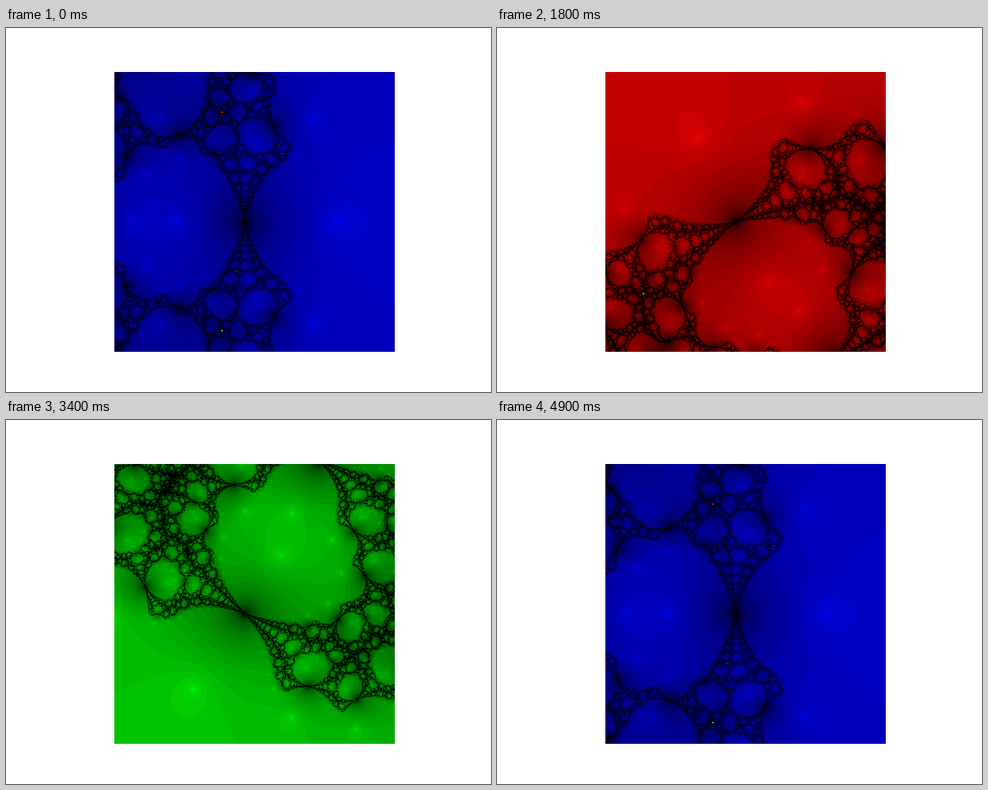
An HTML page with a canvas for the animation above (5000 ms loop, 640x480 px).

```html
<!DOCTYPE html>
<html lang="en">
<head>
<meta charset="utf-8">
<title>Nova fractal</title>
<style>
html, body { margin: 0; width: 100%; height: 100%; overflow: hidden; background: #fff; }
canvas { position: absolute; left: 143px; top: 58px; }
</style>
</head>
<body>
<canvas id="view" width="370" height="369"></canvas>
<script>
const W = 370, H = 369, STEPS = 50, STEP_MS = 100;
const SCALE = 369.6 / 1.87;          // pixels per unit
const X0 = 172.15, Y0 = 197.25;      // origin inside the canvas
const MAX = 30, TOL2 = 0.01 ** 2;
const RED = 0, GREEN = 1, BLUE = 2;
const ctx = document.getElementById('view').getContext('2d');
const cache = [];

// Channel of the cube root of unity closest in direction
function rootChannel(x, y) {
  if (x > -Math.abs(y) / Math.sqrt(3) && Math.abs(y) < Math.sqrt(3) * x) return BLUE;
  return y > 0 ? RED : GREEN;
}

// Newton step for z^3 - 1 plus c = e^(i*angle) / 2
function render(k) {
  const angle = 2 * Math.PI * k / (STEPS - 1);
  const cx = Math.cos(angle) / 2, cy = Math.sin(angle) / 2;
  const img = ctx.createImageData(W, H), px = img.data;
  for (let j = 0, p = 0; j < H; j++) {
    for (let i = 0; i < W; i++, p += 4) {
      let x = (i + 0.5 - X0) / SCALE, y = (Y0 - j - 0.5) / SCALE;
      px[p + 3] = 255;
      for (let n = 1; n < MAX; n++) {
        const a = x * x - y * y, b = 2 * x * y, d = 3 * (a * a + b * b);
        const dx = a / d - x / 3 + cx, dy = -b / d - y / 3 + cy;
        x += dx;
        y += dy;
        if (dx * dx + dy * dy < TOL2) {
          px[p + rootChannel(x, y)] = 255 * (1 - n / MAX);
          break;
        }
      }
    }
  }
  return img;
}

let shown = -1;
function draw() {
  const k = Math.floor(performance.now() / STEP_MS) % STEPS;
  if (k !== shown) {
    cache[k] = cache[k] || render(k);
    ctx.putImageData(cache[k], 0, 0);
    shown = k;
  }
  requestAnimationFrame(draw);
}
draw();
</script>
</body>
</html>
```
